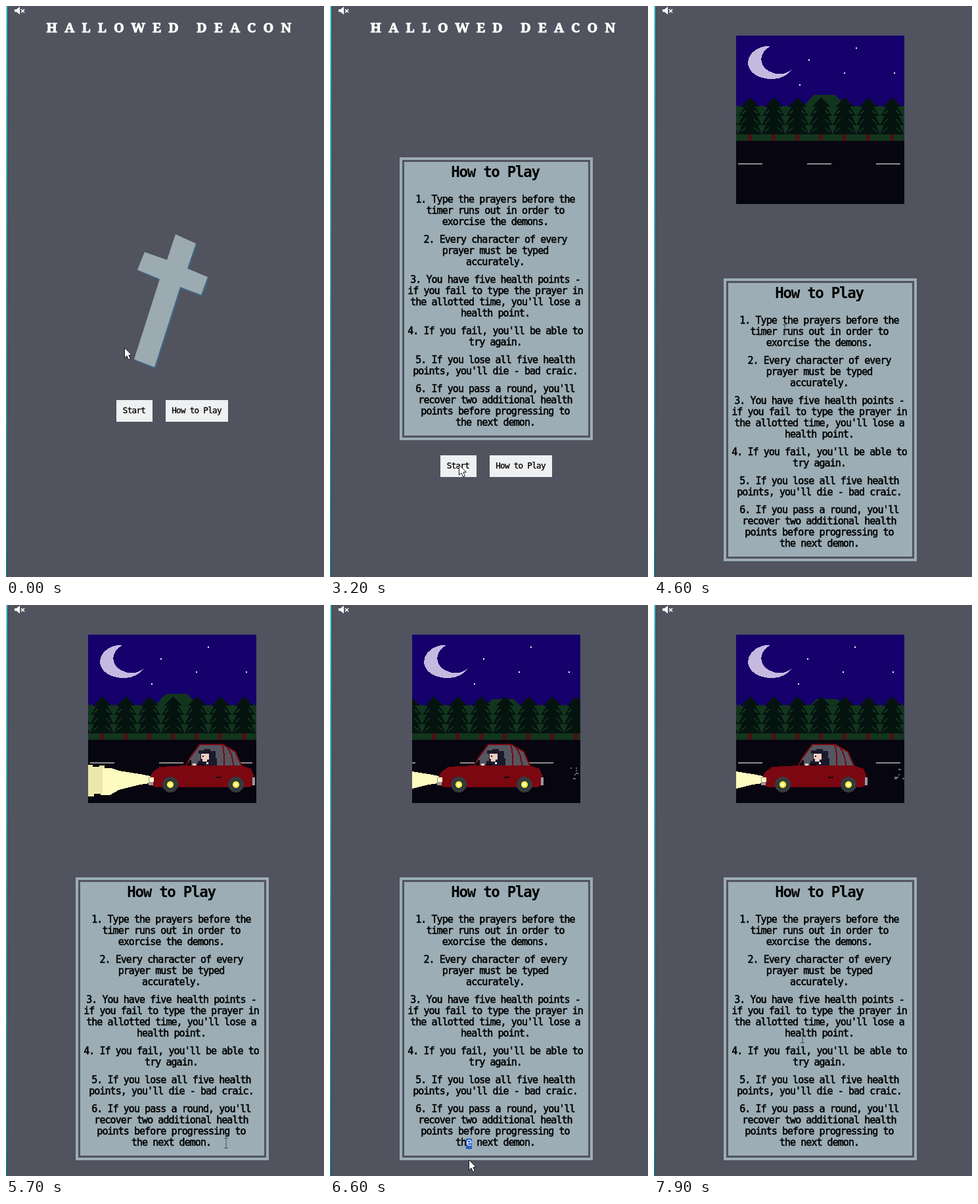
Recreate the animation shown at these times as an HTML page. Size 484 by 868 pixels, loop 8000 ms.

```html
<!DOCTYPE html>
<html lang="en">
<head>
<meta charset="utf-8">
<title>Hallowed Deacon</title>
<style>
html, body { margin: 0; width: 100%; height: 100%; overflow: hidden; background: #51535f; }
svg { display: block; width: 100vw; height: 100vh; }
text { text-anchor: middle; font-family: "DejaVu Sans Mono", monospace; white-space: pre; }
.title { font: 900 20px "Noto Serif", serif; letter-spacing: 11.2px; fill: #fff; stroke: #fff; stroke-width: .9px; }
.rules { font-size: 15px; letter-spacing: -.95px; stroke: #000; stroke-width: .55px; }
.head { font-size: 22.5px; font-weight: bold; letter-spacing: -1.3px; }
.btn { font-size: 12.6px; letter-spacing: -.7px; stroke: #000; stroke-width: .3px; }
#scene { shape-rendering: crispEdges; }
</style>
</head>
<body>
<svg viewBox="0 0 484 868">
  <defs>
    <linearGradient id="edge" x2="0" y2="1">
      <stop offset="0" stop-color="#52d0e4"/><stop offset=".3" stop-color="#3fb4ca"/><stop offset="1" stop-color="#1e7388"/>
    </linearGradient>
    <path id="crossShape" d="M258 347L289 361L276 399L307 412L297 439L265 427L226 549L195 537L234 415L200 401L211 374L245 386Z"/>
    <clipPath id="crossClip"><use href="#crossShape"/><use href="#crossShape" x="2" y="3"/></clipPath>
    <clipPath id="view"><rect x="125" y="45" width="256" height="256"/></clipPath>
    <g id="tree">
      <path fill="#4c0f12" d="M-3 194h6v11h-6z"/>
      <path fill="#05130f" d="M0 139L14 153H8L17 167H11L18 181H12L18 195H-18L-12 181H-18L-11 167H-17L-8 153H-14Z"/>
      <path fill="none" stroke="#12381f" stroke-width="1.5" d="M-12 164l5-5M12 164l-5-5M-13 178l7-6M13 178l-7-6M-14 191l8-6M14 191l-8-6"/>
    </g>
  </defs>

  <rect width="484" height="868" fill="#51535f"/>
  <rect width="2" height="868" fill="url(#edge)"/>
  <rect x="2" width="1" height="868" fill="#454853"/>
  <g fill="#fff" stroke="#fff">
    <path stroke="none" d="M13 5h3l5-4v12l-5-4h-3z"/>
    <path stroke-width="1.6" d="M23 5l5 5M28 5l-5 5"/>
  </g>

  <g id="menu">
    <text class="title" x="253.5" y="40">HALLOWED DEACON</text>
    <g id="buttons">
      <path fill="#eff0f2" d="M168 599h55v33h-55zM243 599h95v33h-95z"/>
      <text class="btn" x="195" y="619">Start</text>
      <text class="btn" x="290" y="619">How to Play</text>
    </g>
  </g>

  <g id="cross">
    <use href="#crossShape" x="2" y="3" fill="#41657b"/>
    <use href="#crossShape" fill="#9caab2"/>
    <g clip-path="url(#crossClip)">
      <g id="shine" fill="#fff">
        <path d="M-70 -9h140v1.3h-140zM-70 -5h140v4h-140zM-70 6h140v1.3h-140z"/>
        <path fill="#35566b" d="M-70 -7h140v1.2h-140zM-70 0h140v3h-140z"/>
      </g>
    </g>
  </g>

  <g id="panel">
    <rect x="106" y="230" width="294" height="430" fill="#9cadb5"/>
    <rect x="111.5" y="235.5" width="283" height="419" fill="none" stroke="#51535f" stroke-width="3"/>
    <text class="head" x="251.5" y="260">How to Play</text>
    <g id="rules" class="rules"></g>
    <g id="picked">
      <rect x="207" y="627" width="9" height="16" fill="#2a5fc9"/>
      <text x="211.7" y="638" font-size="15" fill="#fff">e</text>
    </g>
  </g>

  <g id="scene" clip-path="url(#view)">
    <rect x="125" y="45" width="256" height="256" fill="#15006c"/>
    <path fill="#c6b9e0" d="M177 61C160 60 143 71 143 87C144 102 160 111 180 111C194 111 203 105 209 97C201 104 187 106 175 99C160 91 158 72 177 61Z"/>
    <path id="stars" fill="#fff" d="M233 81h2v2h-2zM287 101h2v2h-2zM305 63h2v2h-2zM219 119h2v2h-2zM363 101h2v2h-2z"/>
    <path id="hill" fill="#12351d" d="M228 152L243 135H276L292 152V205H228Z"/>
    <g id="wood"></g>
    <rect x="125" y="205" width="256" height="96" fill="#07050f"/>
    <g id="dashes" fill="#8c8a92"></g>
    <g id="smoke" fill="#6d6c75"></g>
    <g id="car">
      <path fill="#ece8ac" d="M60 243h18v3h10v-2h8v5h10v6h-4v22h4v5h-8v7h-8v-2h-10v4h-20z"/>
      <path fill="#fdfbc0" d="M171 261L150 257L118 252L106 248H93V289H104L118 281L150 273L171 270Z"/>
      <path fill="#55565f" d="M221 245L226 232L240 212H276L294 222L304 245Z"/>
      <path fill="#1b192b" d="M239 221h8v-2h10v3h8v11h2v12h-29v-8h4v-11h-3z"/>
      <path fill="#f0cfc4" d="M243 226h12v9h-3v3h-7v-4h-2zM230 241h5v4h-5z"/>
      <path fill="#0b0a12" d="M245 229h2v2h-2zM220 239h5v-3h3v9h-8zM237 241h10v4h-10z"/>
      <path fill="#fff" d="M251 239h3v3h-3z"/>
      <path fill="none" stroke="#7b0711" stroke-width="2" d="M219 246L226 232L241 212H276L295 223L305 246M275 212Q279 225 278 246M282 215Q292 228 292 246"/>
      <path fill="#7b0711" d="M165 262L169 254L180 246L220 244H304L319 249L323 259V274L316 277H174L167 274Z"/>
      <path fill="#98999f" d="M163 262h7v12h-7zM321 262h4v12h-4z"/>
      <path fill="#fdfbc0" d="M164 262h7v7h-7z"/>
      <path fill="#16060b" d="M265 261h8v2h-8z"/>
      <g fill="#343a3c"><circle cx="196" cy="273" r="12"/><circle cx="296" cy="273" r="12"/></g>
      <g fill="#f7ef3f"><circle cx="196" cy="273" r="5"/><circle cx="296" cy="273" r="5"/></g>
      <path fill="#fffde0" d="M194 271h4v4h-4zM294 271h4v4h-4z"/>
    </g>
    <rect id="dark" x="125" y="45" width="256" height="256"/>
  </g>

  <path id="arrow" fill="#fff" stroke="#15151a" d="M.5 .5V16L4 12.8L6.6 18.8L9.4 17.6L6.9 11.8H11.4Z"/>
  <path id="beam" fill="none" stroke="#4a4c55" d="M-3 -7.5h6M-3 7.5h6M0 -7.5v15"/>
</svg>
<script>
const $ = id => document.getElementById(id);
const LOOP = 8000;

const rules = [
  [299, "1. Type the prayers before the|timer runs out in order to|exorcise the demons."],
  [360, "2. Every character of every|prayer must be typed|accurately."],
  [421, "3. You have five health points -|if you fail to type the prayer in|the allotted time, you'll lose a|health point."],
  [499, "4. If you fail, you'll be able to|try again."],
  [543, "5. If you lose all five health|points, you'll die - bad craic."],
  [587, "6. If you pass a round, you'll|recover two additional health|points before progressing to|the next demon."]
];
$("rules").innerHTML = rules.map(([y, s]) =>
  s.split("|").map((line, i) => `<text x="251.5" y="${y + 17 * i}">${line}</text>`).join("")).join("");

let wood = "";
for (let x = 74; x < 420; x += 36)
  wood += `<path fill="#12351d" d="M${x} 205V157l9 -5h12l6 3h9v50z"/>`;
for (let x = 74; x < 420; x += 36) wood += `<use href="#tree" x="${x}"/>`;
$("wood").innerHTML = wood;

let dashes = "";
for (let x = 23; x < 400; x += 105) dashes += `<rect x="${x}" y="239" width="37" height="2"/>`;
$("dashes").innerHTML = dashes;

// time, x, y
const track = [
  [0, 180, 519], [400, 180, 519], [1100, 306, 616], [2400, 306, 616], [3200, 196, 697],
  [3500, 196, 697], [3800, 201, 697], [4600, 199, 492], [5000, 199, 492], [5700, 335, 818],
  [5900, 335, 818], [6400, 212, 818], [6600, 211, 843], [7500, 211, 846], [7700, 214, 806],
  [7900, 226, 658], [8000, 226, 658]
];

function pointer(t) {
  let i = 1;
  while (i < track.length - 1 && track[i][0] < t) i++;
  const [t0, x0, y0] = track[i - 1], [t1, x1, y1] = track[i];
  const k = (t - t0) / (t1 - t0), e = k * k * (3 - 2 * k);
  return [x0 + (x1 - x0) * e, y0 + (y1 - y0) * e];
}

const show = (id, on) => $(id).setAttribute("display", on ? "inline" : "none");
const move = (id, x, y = 0, more = "") => $(id).setAttribute("transform", `translate(${x} ${y}) ${more}`);
const within = (t, a, b) => t >= a && t < b;
const even = v => Math.round(v / 2) * 2;
const noise = n => { const v = Math.sin(n * 127.1) * 43758.5; return v - Math.floor(v); };

function smoke(t) {
  if (t < 5900) return "";
  let s = "";
  for (let i = 0; i < 7; i++) {
    const n = t / 100 * 7 + i;
    s += `<rect x="${364 + even(noise(n) * 15)}" y="${247 + even(noise(n + .5) * 17)}" width="${i % 3 ? 2 : 4}" height="2"/>`;
  }
  return s;
}

function draw(t) {
  const help = t >= 2000, play = t >= 3600;
  show("menu", !play);
  show("cross", !help);
  show("panel", help);
  show("scene", play);
  move("buttons", 0, help ? 84 : 0);
  move("panel", 0, play ? 184 : 0);
  show("picked", within(t, 6400, 7600));

  const sweep = within(t, 100, 300) ? t - 100 : within(t, 1800, 2000) ? t - 1800 : -1;
  show("shine", sweep >= 0);
  move("shine", 212 + sweep * .3, 541 - sweep * .95, "rotate(22)");

  if (play) {
    const run = Math.max(0, t - 5950) / 1000;
    const fade = Math.max(0, 1 - (t - 3500) / 850);
    $("dark").setAttribute("opacity", fade * fade);
    move("stars", within(t, 4500, 5800) || within(t, 7000, 7800) ? 2 : 0);
    move("hill", run ? 4 : 0, run ? 8 : 0);
    move("wood", even(run * 18.5) % 36);
    move("dashes", even(run * 108) % 105);
    move("car", even(Math.max(0, 54 + (5700 - t) * .41)));
    $("smoke").innerHTML = smoke(t);
  }

  const [x, y] = pointer(t);
  const text = within(t, 4300, 6500) || t >= 7700;
  show("arrow", !text);
  show("beam", text);
  move(text ? "beam" : "arrow", Math.round(x), Math.round(y));
}

let start;
function tick(now) {
  start ??= now;
  draw(Math.floor((now - start) % LOOP / 100) * 100);
  requestAnimationFrame(tick);
}
draw(0);
requestAnimationFrame(tick);
</script>
</body>
</html>
```
